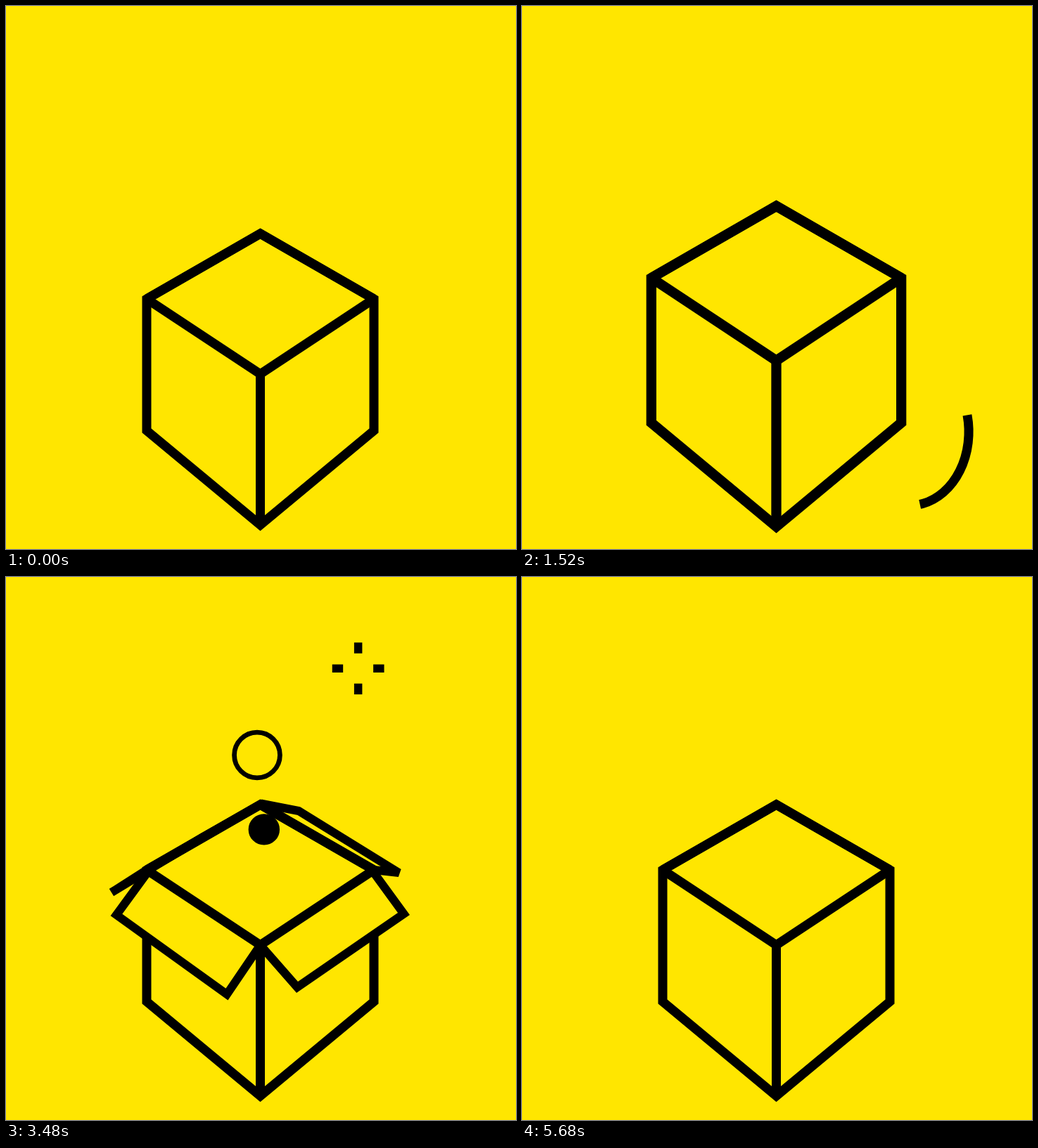
Write an HTML page with a canvas that moves like this. It is 725 by 773 pixels and loops after 5720 ms.

```html
<!DOCTYPE html>
<html lang="en">
<head>
<meta charset="utf-8">
<title>Box</title>
<style>
  html, body { margin: 0; width: 100%; height: 100%; overflow: hidden; background: #ffe600; }
  canvas { display: block; }
</style>
</head>
<body>
<canvas id="stage" width="725" height="773"></canvas>
<script>
const ctx = document.getElementById('stage').getContext('2d');
const LOOP = 5720, STEP = 40, YELLOW = '#ffe600', BLACK = '#000';

const clamp = v => Math.min(1, Math.max(0, v));
const lerp = (a, b, k) => a + (b - a) * k;
const ease = k => k * k * (3 - 2 * k);
const span = (t, from, to) => clamp((t - from) / (to - from));

// Corners of the box
const T = [361.5, 324], L = [200, 417], R = [523, 417], C = [361.5, 524];
const BL = [200, 604.5], BR = [523, 604.5], B = [361.5, 738.8];

// Each flap: hinge ends and how far its free corners swing out
const backFlaps = [
  { hinge: [T, L], swing: [[-83, 47], [-50, 32]] },
  { hinge: [[362, 322.5], R], swing: [[54, 10.5], [35.5, 4]] }
];
const frontFlaps = [
  { hinge: [[203, 418], C], swing: [[-46, 63], [-47.5, 70]] },
  { hinge: [[520, 417], C], swing: [[45.5, 62.5], [52.5, 60]] }
];

const tilts = [[380, 0], [520, 5], [720, -6.3], [920, 6], [1120, -5], [1280, 0]];

const particles = [
  { kind: 'plus', start: 1759, x0: 395, x1: 424, size: 0.5, bar: 10 },
  { kind: 'ring', start: 1853, x0: 345, x1: 311, size: 0.66 },
  { kind: 'plus', start: 2083, x0: 355, x1: 285, size: 1, bar: 8 },
  { kind: 'ring', start: 2300, x0: 360, x1: 350, size: 1 },
  { kind: 'plus', start: 2480, x0: 365, x1: 440, size: 1, bar: 10 },
  { kind: 'plus', start: 2695, x0: 360, x1: 532, size: 1.26, bar: 11.5 },
  { kind: 'ring', start: 2964, x0: 350, x1: 363, size: 0.98 },
  { kind: 'ring', start: 3195, x0: 360, x1: 383, size: 1.1 },
  { kind: 'plus', start: 3520, x0: 360, x1: 490, size: 1.1, bar: 10 },
  { kind: 'ring', start: 3690, x0: 340, x1: 330, size: 1 },
  { kind: 'plus', start: 3820, x0: 350, x1: 305, size: 1, bar: 10 },
  { kind: 'plus', start: 4134, x0: 350, x1: 259, size: 1.04, bar: 9 },
  { kind: 'ring', start: 4399, x0: 365, x1: 419, size: 0.92 },
  { kind: 'plus', start: 4456, x0: 370, x1: 510, size: 0.96, bar: 11 }
];

function line(points, width, closed) {
  ctx.beginPath();
  points.forEach(p => ctx.lineTo(...p));
  if (closed) ctx.closePath();
  ctx.lineWidth = width;
  ctx.stroke();
}

function tiltAt(t) {
  for (let i = 1; i < tilts.length; i++) {
    const [from, a] = tilts[i - 1], [to, b] = tilts[i];
    if (t >= from && t < to) return lerp(a, b, ease(span(t, from, to)));
  }
  return 0;
}

function drawFlap({ hinge, swing }, open) {
  const lift = 104 * Math.sin(Math.PI * open);
  const free = hinge.map((p, i) => [p[0] + swing[i][0] * open, p[1] + swing[i][1] * open - lift]);
  const points = [hinge[0], free[0], free[1], hinge[1]];
  ctx.fillStyle = YELLOW;
  ctx.beginPath();
  points.forEach(p => ctx.lineTo(...p));
  ctx.fill();
  line(points, 12);
}

function drawBox(t) {
  const tilt = tiltAt(t);
  const grow = 1 + 0.1 * ease(span(t, 1280, 1500)) * (1 - ease(span(t, 1540, 1760)));
  const open = ease(span(t, 1540, 1960)) * (1 - ease(span(t, 5200, 5620)));

  ctx.save();
  ctx.translate(361.5, 655 - Math.abs(tilt) * 0.98);
  ctx.rotate(tilt * Math.PI / 180);
  ctx.translate(-361.5, -655);
  ctx.translate(361.5, 716);
  ctx.scale(grow, grow);
  ctx.translate(-361.5, -716);

  if (open > 0) backFlaps.forEach(f => drawFlap(f, open));
  line([T, R, BR, B, BL, L], 13, true);
  line([C, B], 13);
  if (open > 0) frontFlaps.forEach(f => drawFlap(f, open));
  line([L, T, R], 13);
  line([L, C, R], 13);
  ctx.restore();
}

// Curved shake mark that drifts outward; side is 1 for right, -1 for left
function drawArc(t, begin, side) {
  const age = t - begin;
  if (age < 0 || age > 320) return;
  const p = Math.min(6.6, (age - 120) * 0.0275) + (side < 0 ? 0.3 : 0);
  const first = -0.227, last = 1.4;
  const from = lerp(first, last, 0.3 * span(age, 290, 320));
  const to = lerp(first, last, span(age, 0, 90) * (1 - span(age, 280, 320)));
  if (to <= from) return;
  ctx.save();
  if (side < 0) {
    ctx.translate(721, 1);
    ctx.scale(-1, 1);
  }
  ctx.beginPath();
  ctx.ellipse(547.7 + 3.8 * p, 606, 77 + 6.7 * p, 96 + 9 * p, 0, from, to);
  ctx.lineWidth = 13;
  ctx.stroke();
  ctx.restore();
}

function drawRing(x, y, q, size) {
  const radius = 68 * q * size;
  const hollow = clamp((q - 0.3 * size) / 0.3);
  if (hollow >= 1) return;
  const width = radius * (1 - hollow);
  ctx.beginPath();
  ctx.arc(x, y, radius - width / 2, 0, 7);
  ctx.lineWidth = width;
  ctx.stroke();
}

function drawPlus(x, y, q, size, bar) {
  const arm = (6 + 30 * size * q) * span(q, 0, 0.05);
  const left = 1 - span(q, 0.718, 1);
  const gap = arm * (1 - left * left);
  const width = Math.min(bar, arm);
  ctx.fillStyle = BLACK;
  for (const s of [-1, 1]) {
    ctx.fillRect(x + s * gap, y - width / 2, s * (arm - gap), width);
    ctx.fillRect(x - width / 2, y + s * gap, width, s * (arm - gap));
  }
}

function drawParticle(t, { kind, start, x0, x1, size, bar }) {
  const q = (t - start) / 960;
  if (q <= 0 || q >= 1) return;
  const x = lerp(x0, x1, q), y = 490 - 440 * q;
  if (kind === 'ring') drawRing(x, y, q, size);
  else drawPlus(x, y, q, size, bar);
}

function draw(t) {
  ctx.fillStyle = YELLOW;
  ctx.fillRect(0, 0, 725, 773);
  ctx.strokeStyle = BLACK;
  ctx.lineJoin = 'miter';
  ctx.miterLimit = 4;
  drawBox(t);
  drawArc(t, 640, -1);
  drawArc(t, 640, 1);
  drawArc(t, 1364, 1);
  particles.forEach(p => drawParticle(t, p));
}

const origin = performance.now();
function tick() {
  const t = (performance.now() - origin) % LOOP;
  draw(Math.floor(t / STEP) * STEP);
  requestAnimationFrame(tick);
}
tick();
</script>
</body>
</html>
```
